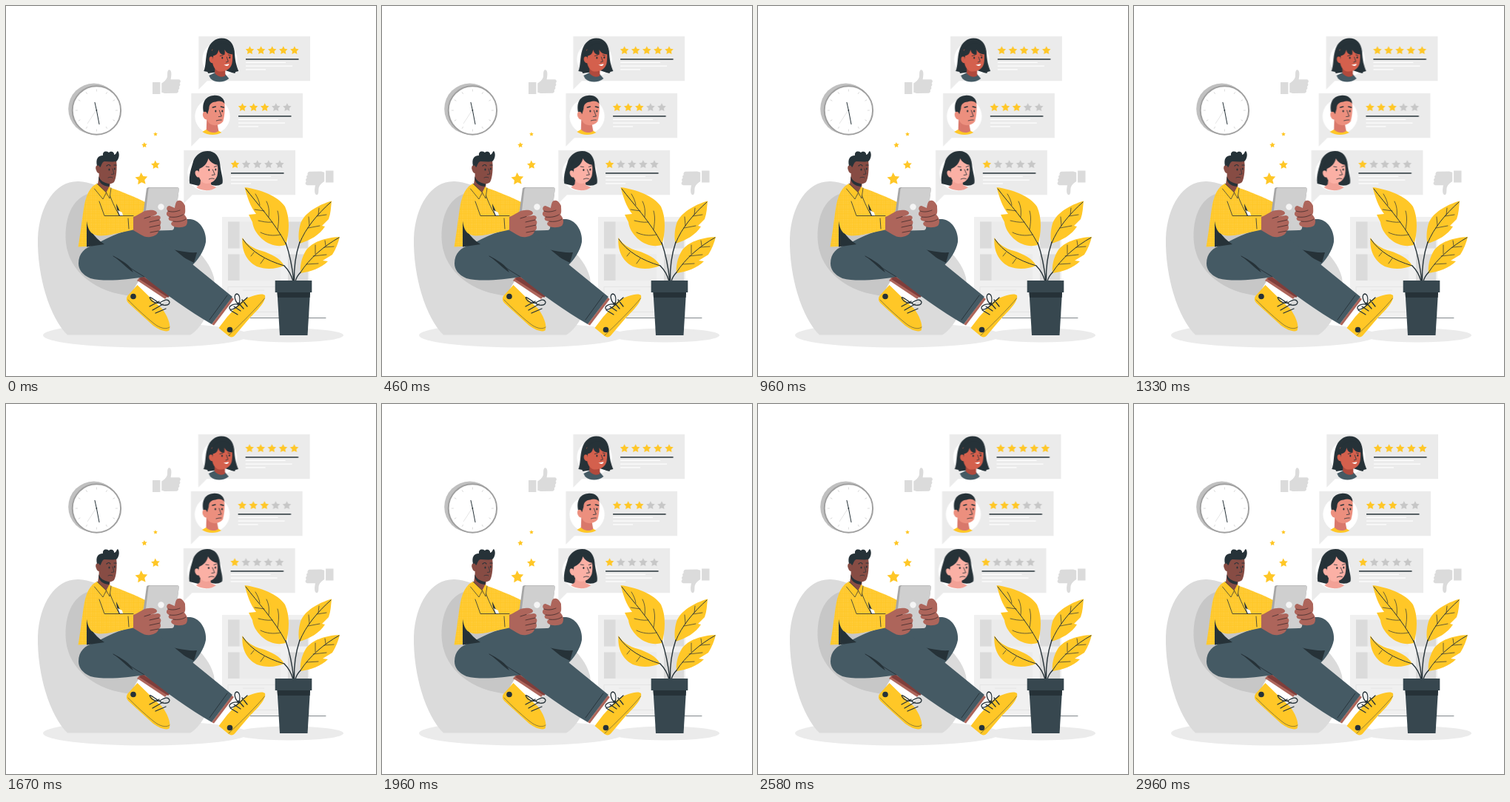
Animation, 500 px wide and 500 px high, one loop 3 s. Source, as an HTML page:

```html
<!DOCTYPE html>
<html lang="en">
<head>
<meta charset="utf-8">
<title>Customer reviews</title>
<style>
  html, body { margin: 0; width: 100%; height: 100%; overflow: hidden; background: #fff; }
  svg { display: block; width: 100vw; height: 100vh; }
  .ink { fill: none; stroke: #263238; stroke-linecap: round; stroke-linejoin: round; }
</style>
</head>
<body>
<svg viewBox="0 0 500 500" xmlns="http://www.w3.org/2000/svg">
  <defs>
    <pattern id="weave" width="2.4" height="2.4" patternUnits="userSpaceOnUse">
      <rect width="2.4" height="2.4" fill="#ffc727"/>
      <rect width="1" height="1" fill="#ffd65c"/>
    </pattern>
    <g id="thumb">
      <rect x="198" y="103" width="10.4" height="16"/>
      <path d="M210.3 104.5C213 103 216.5 100 217.7 96.5C218.5 93.5 217.5 89 219.3 86.8C221 85.4 223 87.2 223.3 90C223.7 93.5 223 96.5 222.6 99.3L233.5 99.3C236.4 99.8 236.5 103 234.6 104.2C236 105.6 235.5 108.2 233.8 108.9C235 110.4 234.4 112.6 232.7 113.2C233.6 115 232.6 117.6 230.2 117.8L214.5 118L210.3 116.8Z"/>
    </g>
  </defs>

  <g id="floor" fill="#ebebeb">
    <ellipse cx="189" cy="445" rx="139" ry="16.5"/>
    <ellipse cx="383" cy="445" rx="73" ry="9.5"/>
  </g>

  <g id="shelf">
    <rect x="292" y="285" width="118" height="136.5" fill="#f0f0f0"/>
    <path d="M300 291.5h71v36h-71zM300 335.5h71v35.500h-71z" fill="#ebebeb"/>
    <path d="M300 291.5h15.5v36H300zM300 335.5h15.5v35.5H300zM381 291.5h27v36h-27zM381 335.5h27v35.5h-27z" fill="#dbdbdb"/>
    <path d="M300 379.5h71v34h-71zM320 384h29" fill="none" stroke="#e4e4e4"/>
    <path class="ink" d="M330 421.6H432" stroke-width=".6"/>
  </g>

  <g id="clock">
    <circle cx="118.7" cy="139" r="34.5" fill="#c0c0c0"/>
    <circle cx="122.4" cy="141" r="32.7" fill="#fff" stroke="#a0a0a0" stroke-width="2"/>
    <g id="ticks" stroke="#d4d4d4" stroke-width=".8"></g>
    <path d="M123 139L110 159" stroke="#d4d4d4" stroke-width=".6"/>
    <path class="ink" d="M120 130.3L122.4 141L126 159.7" stroke-width="1"/>
    <circle cx="122.4" cy="141" r=".9" fill="#263238"/>
  </g>

  <g fill="#dbdbdb">
    <use href="#thumb"/>
    <use href="#thumb" transform="rotate(180 320.25 170.75)"/>
  </g>

  <g id="bubbles"></g>

  <g id="beanbag">
    <path d="M83 444.5C59 421 42 365 43 314C45 269 67 236 98 237C128 239 157 260 190 283C235 307 274 336 281 367C286 398 266 435 249 444.5Z" fill="#dbdbdb"/>
    <path d="M119 252C92 255 78 283 81 320C85 358 120 388 172 392L210 372L198 285C170 262 145 249 119 252Z" fill="#c7c7c7"/>
  </g>

  <g id="legs">
    <path d="M177 371L187 359L224 386L214 397Z" fill="#ad655b"/>
    <path d="M184 365L223 390L219 394L180 369Z" fill="#7f3e3b"/>
    <path d="M173 382L179 372L215 396L208 407Z" fill="#fff"/>
    <path d="M177.500 377L164 392C162 396 163 399 166 402L199 432C207 438 216 441 220.500 438.500C224 431 217 417 211 409L200 399Z" fill="#ffc727"/>
    <path class="ink" d="M165 397C170 403 196 427 204 432C211 436 217 437 221 434" stroke-width=".5"/>
    <circle cx="172" cy="392.500" r="3.800" fill="#263238"/>
    <path class="ink" d="M194 406L207 399M198 411L212 403M202 415L216 409M206 401C198 395 192 391 195 396C197 400 203 402 208 401C214 397 219 395 221 400C221 405 212 406 207 401" stroke-width="1.300"/>

    <path d="M181 306C204 298 232 287 249 288C264 290 271 306 270 319C268 331 259 344 250 352L222 372L190 350Z" fill="#455a64"/>
    <path d="M211 325C226 329 242 334 258 333L254 347Z" fill="#263238"/>

    <path d="M279 430L307 394L322 405L294 437Z" fill="#fff"/>
    <path d="M278 430L305 394L308 396L281 431.500Z" fill="#ad655b"/>
    <path d="M287.500 435L299 420C306 413 312 404 320 398C331 391 347 387 350 391C352 399 339 412 329 422L309 445.500C306 448.500 303 448 299 444.500Z" fill="#ffc727"/>
    <path class="ink" d="M301 445C314 433 341 406 349.500 395" stroke-width=".5"/>
    <circle cx="302.500" cy="437.500" r="3.800" fill="#263238"/>
    <path class="ink" d="M303 411L313 417M308 406L317 412M314 401L321 409M319 397L326 406M315 404C309 399 307 390 312 389C317 390 316 399 315 404C309 401 301 405 302 409C304 412 311 408 315 404M315 404L326 394" stroke-width="1.300"/>

    <path d="M98 348C98 334 107 326 119 323C133 316 153 304 176 301C197 302 213 316 231 332L306 393L278 430C248 413 215 389 187 366C163 370 132 373 114 368C103 363 98 356 98 348Z" fill="#455a64"/>
    <path class="ink" d="M145 338C156 343 165 353 174 358L187 366M299 391L275 424" stroke-width=".9"/>
    <path d="M145 338C157 344 168 350 172 360C164 355 155 345 145 338Z" fill="#263238"/>
  </g>

  <g id="torso">
    <path d="M123 240C114 244 109 254 106 268C103 285 101 306 97.500 325.500L109 325L110 290L134 310L176 300L190 266C176 259 158 251 139 245Z" fill="url(#weave)"/>
    <path d="M109 285C111 301 118 312 133 322L109 325.500Z" fill="#263238"/>
    <path d="M110 261C107 278 108 297 114 305C120 312 130 311 142 309L174 302L172 284L134 283L127 263Z" fill="url(#weave)"/>
    <path d="M149 267L157 284L153 284C151 278 149 273 149 267Z" fill="#263238"/>
    <path d="M151 276L157 279L158 283.500L154 283.500Z" fill="#fff"/>
    <path class="ink" d="M126 264L133 283.500L172 283.500M140 255C144 266 149 276 153 283M165 287L166 301" stroke-width=".8"/>
    <path d="M126 228L124 241L135 256L140 247L141 235Z" fill="#874c44"/>
    <path d="M123 240L119.500 247L131 261L136 254L140 260L142 246L139.500 244L135.500 252Z" fill="#ffc727"/>
    <path class="ink" d="M119.500 247L131 261L135.500 252L140 260L142 246M135.500 252L123 240" stroke-width=".7"/>
  </g>

  <g id="head">
    <path d="M127 212C126 220 124 230 128 236C133 241 142 242 146 238C149 233 150.500 220 149 208L136 205Z" fill="#874c44"/>
    <path d="M125.500 230C127 236 132 239 140 240.500L139 244C131 243 124 239 125.500 230Z" fill="#263238"/>
    <path d="M127 216C122 213 120 218 122 222C123 226 126 227 128 225Z" fill="#874c44"/>
    <path d="M123 216C121 207 124 202 131 202C130 197 135 195 139 198C142 195 147 198 146 201C149 201 149 197 151 196C154 199 153 207 149 210C144 211 138 210 133 210C129 211 129 217 127 218C126 215 124 215 123 216Z" fill="#263238"/>
    <path class="ink" d="M136 216C138 214 140 214 141 216M146 215L149 215" stroke-width="1.200"/>
    <path class="ink" d="M144 220L146 227L142.500 227.500M138 232C140 231 142 231 144 232" stroke-width=".7"/>
    <ellipse cx="139.500" cy="221" rx="1" ry="1.600" fill="#263238"/>
    <ellipse cx="146.800" cy="220" rx=".9" ry="1.500" fill="#263238"/>
  </g>

  <g id="tablet">
    <path d="M190 246.500Q190.500 245 193 245L231 245Q234 245 233.700 248L227 300Q226.500 303 223 303L185 304Q182 304 182.500 301Z" fill="#a6a6a6"/>
    <path d="M192.500 247.500Q193 245.500 195 245.500L231.500 245.500Q234 245.500 233.700 248L227 300Q226.500 303 223 303L188 303.500Q185.500 303.500 186 301Z" fill="#cfcfcf"/>
    <circle cx="209.500" cy="271.500" r="4.200" fill="#f5f5f5"/>
    <g fill="#ad655b">
      <path d="M172 285C181 282 185 276 193 276C199 275 204 277 204 280C204 283 196 284 195 284.500L205 283C209 283 210 287 207 289C210 290 210 294 208 296C210 299 209 303 206 304C206 308 201 311 195 312C187 314 180 307 172 303Z"/>
      <path d="M228 273C229 267 230 263 233 263C237 262 240 266 242 270C242 275 243 279 241 282C246 287 246 294 243 297C238 300 229 300 225 297C222 295 223 292 226 291C220 291 218 287 221 285C216 284 216 279 219 277C216 275 217 270 221 270Z"/>
    </g>
    <path d="M195 284.500L187 287M207 289L194 292M208 296L194 299M206 304L195 306M219 277C224 279 230 278 235 276M221 285C228 286 234 285 239 282M226 291C232 292 239 291 243 288" fill="none" stroke="#3f2b2c" stroke-width=".8" stroke-linecap="round"/>
  </g>

  <g id="sparks"></g>

  <g id="plant">
    <g fill="#ffc727">
      <path d="M322.500 245C343 248 367 256 377 271C384 286 383 308 378 323C367 326 355 323 345 314C338 307 334 300 333 292L328 282L338 281C330 271 326 258 322.500 245Z"/>
      <path d="M440 263.500C421 269 403 280 398 294C395 304 395 314 396.500 321C411 317 424 309 431 298L427 297L436 288C439 280 439 272 440 263.500Z"/>
      <path d="M451 312C431 313 413 319 405 331C399 341 397 352 398 361C412 359 426 354 435 345L428 344L441 336C446 328 449 320 451 312Z"/>
      <path d="M319.500 313C318 330 325 345 339 352C352 357 366 355 376 351C371 341 358 335 346 331C334 328 325 322 319.500 313Z"/>
    </g>
    <g class="ink" stroke-width="1">
      <path d="M324 247C339 267 363 292 378 321M439 265C421 281 405 300 397 320M450 313C430 324 410 341 398 360M320 315C331 332 352 344 376 351"/>
      <path d="M343 269C342 263 340 259 337 254M355 285C356 276 355 270 352 264M367 302C369 291 369 284 367 277M349 277L336 275M360 292C352 293 346 291 341 290M371 309C361 311 352 310 344 306" stroke-width=".7"/>
      <path d="M422 282L423 273M410 297L409 285M420 284L433 282M408 300L424 297M432 324L431 317M418 335L418 323M430 326L443 325M415 338L433 336M406 349L422 348M335 333L331 338M349 341L344 348" stroke-width=".7"/>
      <path d="M378 320C384 337 387 354 389 372M397 319C391 337 389 356 389.500 372M398 360C394 364 392 368 391 372M376 351C382 357 386 365 388 372" stroke-width="1.400"/>
    </g>
    <path d="M366.500 386L411 386L407.500 445L370 445Z" fill="#37474f"/>
    <path d="M366.500 386L411 386L410.600 394L367 394Z" fill="#263238"/>
    <rect x="363.700" y="371" width="49.600" height="16" fill="#37474f"/>
  </g>
</svg>

<script>
const $ = id => document.getElementById(id);
const YELLOW = '#ffc727', DARK = '#263238', GREY = '#c7c7c7';

function star(x, y, r, fill, turn = 0) {
  const pts = Array.from({ length: 10 }, (_, i) => {
    const a = i * Math.PI / 5 - Math.PI / 2 + turn;
    const d = i % 2 ? r * 0.5 : r;
    return (x + d * Math.cos(a)).toFixed(2) + ',' + (y + d * Math.sin(a)).toFixed(2);
  });
  return `<polygon points="${pts.join(' ')}" fill="${fill}"/>`;
}

const path = (d, fill) => `<path d="${d}" fill="${fill}"/>`;
const ink = (d, w = 0.8) => `<path class="ink" d="${d}" stroke-width="${w}"/>`;
const eye = (x, y) => `<ellipse cx="${x}" cy="${y}" rx="1" ry="1.5" fill="${DARK}"/>`;
const bar = (y, w, h, fill) => `<rect x="63.7" y="${y}" width="${w}" height="${h}" fill="${fill}"/>`;

// Portraits use coordinates local to their bubble.
const longHair =
  path('M7 47C10 40 9 29 12 19C15 8 23 2.500 31 2.500C42 2.500 47 10 48.500 20C49 32 51 40 54 47L50 48L49 50L45 49L36 46L20 49L13 50L12 48Z', DARK) +
  path('M14 53L22 49L35 50L41 57C34 63 22 63 16 57Z', '#455a64') +
  path('M22 38L22 50C26 55 33 56 36 53L36 40Z', '#b04a3d') +
  path('M18 18C17 30 18 43 26 47C34 49 43 45 45 37C46.500 29 46 21 44 16L31 13Z', '#d4604d') +
  path('M16 31C16 22 18 14 29 10C39 8 46 13 47 24C42 25 38 23 35 18C36 22 35 25 35 25C30 25 28 22 27 18C26 24 23 26 20 26L19 31Z', DARK) +
  path('M19 28C14 25 13 32 16 35C18 37 20 36 20 35Z', '#d4604d') +
  ink('M29 26.500L33 25.500M40 25L43 26M38 28L40 34L37 35') + eye(32, 29) + eye(42, 28.500) +
  path('M34 38C36 38.500 39 38 41 37C41 40.500 37 41 34 38Z', '#fff');

const shortHair =
  path('M15 52L22 48L36 50L41 53C34 57 22 57 15 52Z', YELLOW) +
  path('M21 34L20.500 49C25 54 33 54 37 51L35 40Z', '#d9786b') +
  path('M20 13C19 27 20 37 25 41C31 45 39 43 43 38C45.500 29 46 18 44.500 10L32 5Z', '#ec8f7e') +
  path('M17 27C14 14 18 4 30 3C39 2 45 7 45 14C42 10 37 10 33 11.500C27 12 24 15 24 21L22 28Z', DARK) +
  path('M21 26C16 22 14 29 17 33C19 37 23 35 23 34Z', '#ec8f7e') +
  ink('M29 19L33 18M40 18L44 19', 1.4) + ink('M38 23L41 31L37 31.500M34 37C37 36 39 36 41 36') +
  eye(33, 24) + eye(42, 24);

const bob =
  path('M8 45C6 34 11 22 13 14C17 5 24 1 32 1C43 1 48 9 49 19C50 30 54 40 52 45C46 49 40 48 36 46L20 48Z', DARK) +
  path('M23 38L22 46L17 50C23 55 37 56 44 50L37 47L36 39Z', '#f2a196') +
  path('M20 18C18 30 20 39 25 43C32 48 42 43 45 35C47 26 46 18 43 12L32 9Z', '#fbb0a5') +
  path('M17 32C16 22 18 11 28 7C38 5 45 9 47 20C40 19 36 16 33 11C32 18 26 23 21 25L20 33Z', DARK) +
  path('M20 28C15 25 14 31 17 35C19 38 22 36 22 35Z', '#fbb0a5') +
  ink('M30 22L34 22.500M41 22.500L45 21M39 26L42 33L38 33.500M34 39C37 37.500 39 38 41 38.500') +
  eye(34, 26.500) + eye(43, 26);

function bubble(face, score, i) {
  const stars = Array.from({ length: 5 }, (_, k) =>
    star(69.2 + 15.1 * k, 19.2, 6, k < score ? YELLOW : GREY)).join('');
  return `<g transform="translate(${260.3 - 10 * i} ${41 + 77 * i})">
    <path d="M0 0H150.7V60.300H11.500L0 71.700Z" fill="#ebebeb"/>
    <circle cx="28.700" cy="31" r="23.700" fill="#fff"/>
    ${face}${stars}
    ${bar(30.2, 71.5, 1.5, DARK)}
    ${bar(34.8, 54, 1.2, '#fff')}${bar(39.500, 63, 1.2, '#fff')}${bar(44.300, 27, 1.2, '#fff')}
  </g>`;
}

$('bubbles').innerHTML = bubble(longHair, 5, 0) + bubble(shortHair, 3, 1) + bubble(bob, 1, 2);

$('sparks').innerHTML = [[183, 233.8, 8.8], [202, 214.800, 6.2], [187, 188, 3.9], [202, 173.200, 3]]
  .map(([x, y, r]) => star(x, y, r, YELLOW, -0.06)).join('');

$('ticks').innerHTML = Array.from({ length: 12 }, (_, i) =>
  `<path d="M122.4 112.500v3" transform="rotate(${i * 30} 122.4 141)"/>`).join('');

// Sideways shake: small, wide, then settling.
const shake = [0, -0.5, 1, -2, 2, -2, 2, -2, 1, -0.5, 0];
$('bubbles').animate(
  shake.map(x => ({ transform: `translateX(${x}px)`, easing: 'cubic-bezier(.36,-.01,.5,1.38)' })),
  { duration: 1500, iterations: Infinity }
);
</script>
</body>
</html>
```
